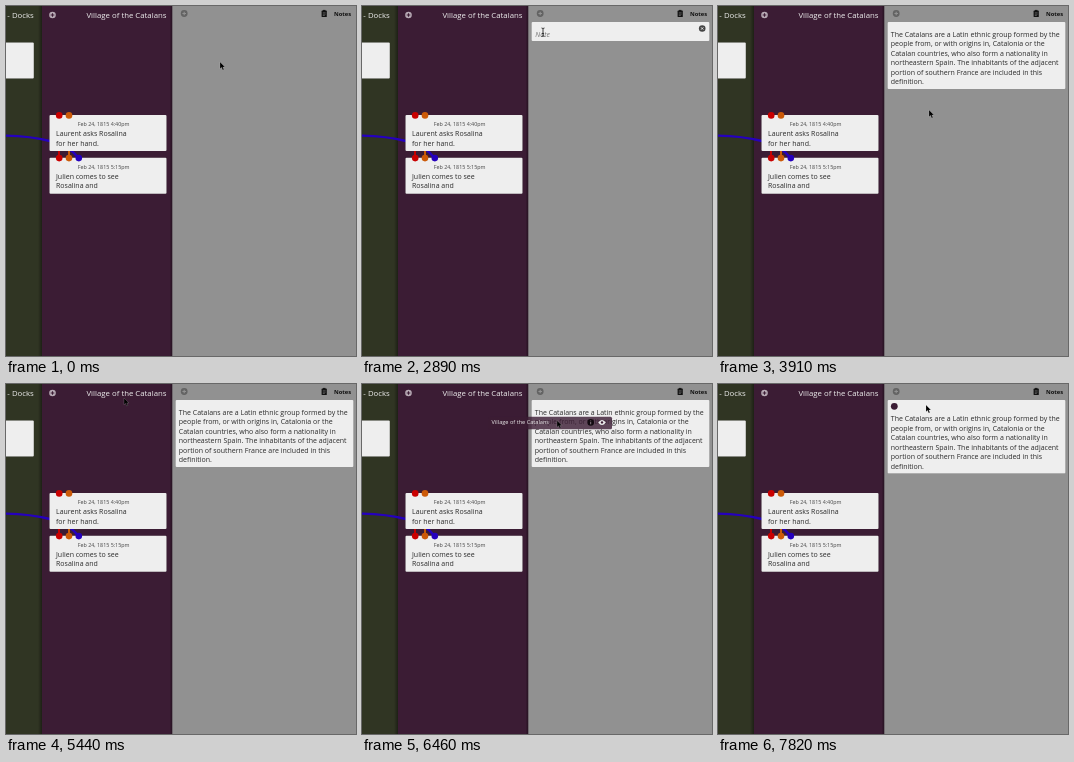
An HTML page for the animation above (7.99 s loop, 350 px wide and 350 px high).

```html
<!DOCTYPE html>
<html lang="en">
<head>
<meta charset="utf-8">
<title>Adding a note</title>
<style>
html, body { margin: 0; width: 100%; height: 100%; overflow: hidden; background: #919191; }
svg { display: block; width: 100vw; height: 100vh; }
text { font: 7px "Open Sans", "Noto Sans", sans-serif; fill: #2b2b2b; }
.title { font-size: 7.8px; fill: #eee; text-anchor: end; }
.date { font-size: 5.35px; fill: #444; }
.card { fill: #eee; filter: drop-shadow(0 .6px .6px #0007); }
</style>
</head>
<body>
<svg viewBox="0 0 350 350">
  <defs>
    <linearGradient id="shade"><stop stop-opacity="0"/><stop offset="1" stop-opacity=".4"/></linearGradient>
    <path id="plus" d="M-1.8 0H1.8M0-1.8V1.8" stroke-width="1.1"/>
  </defs>

  <rect width="36" height="350" fill="#303523"/>
  <rect x="32" width="4" height="350" fill="url(#shade)"/>
  <rect x="36" width="130.5" height="350" fill="#3b1c34"/>
  <rect x="163.5" width="3" height="350" fill="url(#shade)"/>
  <rect x="166.5" width="183.5" height="350" fill="#919191"/>
  <text class="title" x="27.8" y="11.8">- Docks</text>
  <text class="title" x="160.5" y="11.8">Village of the Catalans</text>
  <g transform="translate(46.5 9)"><circle r="3.3" fill="#b7a9b4"/><use href="#plus" stroke="#3b1c34"/></g>
  <g transform="translate(178.2 7.5)"><circle id="add" r="3.4"/><use href="#plus" stroke="#919191"/></g>
  <rect x="315.6" y="4.6" width="5.2" height="6.4" rx=".6" fill="#111"/>
  <path d="M317 3.9h2.4v1H317z" fill="#111"/>
  <path d="M316.8 6.8h2.8M316.8 8.2h2.8M316.8 9.5h2" stroke="#919191" stroke-width=".5"/>
  <text x="328" y="10" style="font-size:5.8px;font-weight:700;fill:#111">Notes</text>

  <rect class="card" x="-10" y="36.5" width="37.8" height="36" rx="1"/>
  <path d="M-2 129.6Q24 130 44 135T72.5 152" fill="none" stroke="#2500bd" stroke-width="2.4"/>
  <path d="M53 109v43" stroke="#c40000" stroke-width="2"/>
  <path d="M63 109v43" stroke="#c85a08" stroke-width="2"/>
  <g id="cards"></g>

  <rect id="note" class="card" x="169.5" y="16" width="178" rx="1"/>
  <circle id="tag" cx="176.3" cy="22.3" r="3.4" fill="#3b1c34"/>
  <text id="hint" x="173.3" y="30.7" style="font-style:italic;fill:#777">Note</text>
  <g id="body"></g>
  <g id="close" transform="translate(340.2 22.5)">
    <circle r="3.3" fill="#444"/><use href="#plus" stroke="#eee" transform="rotate(45) scale(.85)"/>
  </g>

  <g id="ghost">
    <rect width="124" height="12.5" rx="1.5" fill="#3b1c34" opacity=".8"/>
    <text x="3.6" y="7.7" style="font-size:5.6px;fill:#eee">Village of the Catalans</text>
    <circle cx="102.7" cy="5.7" r="3.3" fill="#120a10"/>
    <path d="M102.7 3.8v.8M102.7 5.3v2.3" stroke="#a797a2" stroke-width=".8"/>
    <path d="M110.2 5.7q3.8-5 7.6 0q-3.8 5-7.6 0" fill="#eee"/>
    <circle cx="114" cy="5.7" r="1.2" fill="#3b1c34"/>
  </g>
  <g id="pointer">
    <path id="arrow" d="M0 0V6.8L1.6 5.3 2.7 7.9 3.9 7.4 2.8 4.9H4.9Z" fill="#000" stroke="#fff" stroke-opacity=".3" stroke-width=".5"/>
    <path id="hand" d="M0 0Q1.1-.5 1.4.5L1.8 2.4 4.2 3Q5.2 3.4 4.9 5L4.3 7.4H1L-.9 5Q-1.7 3.8-.6 3.8L.4 4.4-.6 1Q-.8.2 0 0Z" fill="#fff" stroke="#000" stroke-width=".7"/>
    <path id="beam" d="M-1.5 0Q0 0 0 1V7.5Q0 8.5-1.5 8.5M1.5 0Q0 0 0 1M0 7.5Q0 8.5 1.5 8.5M-.9 5.4H.9" fill="none" stroke="#111" stroke-width=".8"/>
  </g>
</svg>
<script>
const LOOP = 7990, STEP = 170;
const OPEN = 1360, PASTE = 3230, GRAB = 5610, DROP = 6970;
const $ = id => document.getElementById(id);
const show = (id, on) => $(id).style.display = on ? '' : 'none';
const move = (id, x, y) => $(id).setAttribute('transform', `translate(${x} ${y})`);
const label = (x, y, s, cls = '') => `<text class="${cls}" x="${x}" y="${y}">${s}</text>`;

const dots = ['#c90000', '#cc5a08', '#2500bd'];
const card = (y, date, lines, n) =>
  `<rect class="card" x="43.5" y="${y}" width="117" height="36" rx="1"/>` +
  label(71.8, y + 10.8, date, 'date') +
  lines.map((s, i) => label(50, y + 21.2 + 9.5 * i, s)).join('') +
  dots.slice(0, n).map((c, i) => `<circle cx="${53.2 + 9.8 * i}" cy="${y + .4}" r="3.3" fill="${c}"/>`).join('');

$('cards').innerHTML =
  card(109, 'Feb 24, 1815 4:40pm', ['Laurent asks Rosalina', 'for her hand.'], 2) +
  card(151.7, 'Feb 24, 1815 5:15pm', ['Julien comes to see', 'Rosalina and'], 3);

$('body').innerHTML = [
  'The Catalans are a Latin ethnic group formed by the',
  'people from, or with origins in, Catalonia or the',
  'Catalan countries, who also form a nationality in',
  'northeastern Spain. The inhabitants of the adjacent',
  'portion of southern France are included in this',
  'definition.'
].map((s, i) => label(172.8, 30.5 + 9.5 * i, s)).join('');

// Pointer path: time, x, y
const path = [
  [0, 214, 56], [1020, 175, 10], [1530, 175, 10], [2380, 181, 22], [2890, 181, 22],
  [3910, 211, 104], [5100, 118, 14], [GRAB, 118, 14], [6460, 195, 36.5],
  [DROP, 208, 21], [LOOP, 208, 21]
];
function pointerAt(t) {
  const i = path.findIndex(k => k[0] > t);
  const [t0, x0, y0] = path[i - 1], [t1, x1, y1] = path[i];
  const p = (t - t0) / (t1 - t0), e = p * p * (3 - 2 * p);
  return [x0 + (x1 - x0) * e, y0 + (y1 - y0) * e];
}

function draw(now) {
  const t = Math.floor(now % LOOP / STEP) * STEP;
  const [x, y] = pointerAt(t);
  const open = t >= OPEN, filled = t >= PASTE, tagged = t >= DROP;
  const height = tagged ? 73.5 : filled ? 67 : 19;
  const overAdd = Math.hypot(x - 178, y - 7.5) < 5;
  const overNote = open && t < GRAB && x > 169 && y > 16 && y < 16 + height;

  $('note').setAttribute('height', height);
  $('add').setAttribute('fill', overAdd ? '#000' : '#636363');
  show('note', open);
  show('hint', open && !filled);
  show('body', filled);
  show('tag', tagged);
  show('close', open && !filled || overNote);
  move('body', 0, tagged ? 6.6 : 0);

  show('ghost', t > GRAB && !tagged);
  move('ghost', x - 69, y - 3.8);
  move('pointer', x, y);
  show('hand', overAdd);
  show('beam', overNote);
  show('arrow', !overAdd && !overNote);
}

let start;
function tick(now) {
  start ??= now;
  draw(now - start);
  requestAnimationFrame(tick);
}
draw(0);
requestAnimationFrame(tick);
</script>
</body>
</html>
```
